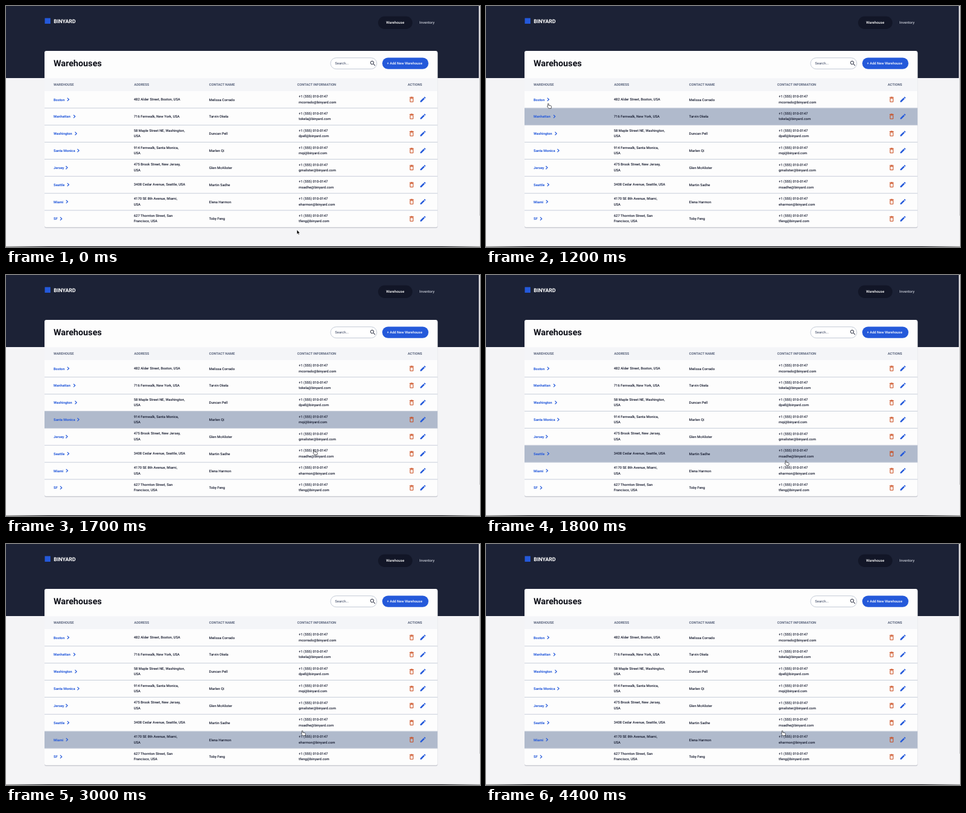
An HTML page for the animation above (4.6 s loop, 800 by 408 pixels).

```html
<!DOCTYPE html>
<html lang="en">
<head>
<meta charset="utf-8">
<title>Warehouses</title>
<style>
html, body { margin: 0; width: 100%; height: 100%; overflow: hidden; background: #f4f4f6; }
svg { display: block; width: 800px; height: 408px; }
text { font: 500 5.9px Roboto, "Open Sans", sans-serif; fill: #13182c; text-rendering: geometricPrecision; white-space: pre; }
.title { font-size: 14.7px; font-weight: 700; fill: #0b0d16; }
.brand { font-size: 9px; font-weight: 700; fill: #fff; }
.nav { font-size: 6.1px; fill: #fff; }
.dim { fill: #c3c7d2; }
.head { font-size: 5.75px; font-weight: 600; fill: #5c667e; }
.link { font-weight: 600; fill: #2459da; }
.hint { fill: #5c667e; }
.light { fill: #fff; }
</style>
</head>
<body>
<svg viewBox="0 0 800 408">
  <defs>
    <linearGradient id="edge">
      <stop offset="0" stop-color="#999"/>
      <stop offset=".09" stop-color="#16171c"/>
      <stop offset=".92" stop-color="#16171c"/>
      <stop offset="1" stop-color="#999"/>
    </linearGradient>
    <path id="trash" fill="#c94515" d="M6 19c0 1.1.9 2 2 2h8c1.1 0 2-.9 2-2V7H6v12zM8 9h8v10H8V9zm7.5-5l-1-1h-5l-1 1H5v2h14V4z"/>
    <path id="pencil" fill="#2459da" d="M3 17.25V21h3.75L17.81 9.94l-3.75-3.75L3 17.25zM20.71 7.04c.39-.39.39-1.02 0-1.41l-2.34-2.34c-.39-.39-1.02-.39-1.41 0l-1.83 1.83 3.75 3.75 1.83-1.83z"/>
    <path id="lens" fill="#2b3042" d="M15.5 14h-.79l-.28-.27C15.41 12.59 16 11.11 16 9.5 16 5.91 13.09 3 9.5 3S3 5.91 3 9.5 5.91 16 9.5 16c1.61 0 3.09-.59 4.23-1.57l.27.28v.79l5 4.99L20.49 19l-4.99-5zm-6 0C7.01 14 5 11.99 5 9.5S7.01 5 9.5 5 14 7.01 14 9.5 11.99 14 9.5 14z"/>
    <path id="chevron" d="M-1.5 -2.6L1.2 0L-1.5 2.6" fill="none" stroke="#2459da" stroke-width="1.2"/>
  </defs>

  <rect width="800" height="408" fill="#f4f4f6"/>
  <rect width="798" height="122" fill="#1c2236"/>
  <rect x="798" width="2" height="408" fill="#f3f3f4"/>
  <rect x="799" width="1" height="355" fill="#c6c6c9"/>
  <rect y="406.8" width="800" height="1.2" fill="url(#edge)"/>

  <rect x="65.5" y="20.5" width="9.5" height="9.5" fill="#2459da"/>
  <text class="brand" x="80.4" y="29">BINYARD</text>
  <rect x="628" y="17.5" width="58" height="21.5" rx="10.75" fill="#121627"/>
  <text class="nav" x="641.6" y="30.4">Warehouse</text>
  <text class="nav dim" x="697.8" y="30.4">Inventory</text>

  <rect x="65" y="77" width="663.5" height="299" rx="3" fill="#c9cbd2"/>
  <rect x="65" y="76" width="663.3" height="298.6" rx="3" fill="#fdfdfd"/>
  <rect x="65" y="122.4" width="663.3" height="21.6" fill="#f4f5f8"/>
  <text class="title" x="80.2" y="102">Warehouses</text>
  <rect x="547.8" y="87.8" width="78" height="18.8" rx="9.4" fill="#fff" stroke="#bcc3d1" stroke-width=".9"/>
  <text class="hint" x="555.2" y="99.4">Search...</text>
  <use href="#lens" transform="translate(613.3 91.3) scale(.49)"/>
  <rect x="635" y="87.5" width="78" height="19.2" rx="9.6" fill="#2459da"/>
  <text class="light" x="643" y="99.4">+ Add New Warehouse</text>

  <rect id="hover" x="65" width="663.3" height="28.85" fill="#b0bacc"/>
  <g id="table"></g>
  <path id="arrow" d="M0 0V7.2L1.7 5.7 2.8 8.3 4 7.8 2.9 5.3H5z" fill="#000" stroke="#fff" stroke-width=".5"/>
  <path id="hand" d="M-1.9 -4c.8 0 .9.6.9 1.2v2l3.2.6c1 .2 1.4.7 1.3 1.7L3 4.4H-1.2L-3.6 1.2c-.4-.7.3-1.2.9-.8l.1.1V-3c0-.6.1-1 .7-1z" fill="#fff" stroke="#20222a" stroke-width=".75"/>
</svg>
<script>
const TOP = 144, ROW = 28.85, STEP = 100, LOOP = 4600;
const $ = id => document.getElementById(id);

// city, chevron x, address lines, contact, mailbox
const rows = [
  ['Boston', 105, ['482 Alder Street, Boston, USA'], 'Melissa Corrado', 'mcorrado'],
  ['Manhattan', 115.5, ['716 Fernwalk, New York, USA'], 'Tarvin Okela', 'tokela'],
  ['Washington', 118, ['58 Maple Street NE, Washington,', 'USA'], 'Duncan Pell', 'dpell'],
  ['Santa Monica', 122, ['914 Fernwalk, Santa Monica,', 'USA'], 'Marlen Qi', 'mqi'],
  ['Jersey', 102.5, ['475 Brook Street, New Jersey,', 'USA'], 'Glen McAlister', 'gmalister'],
  ['Seattle', 105, ['3408 Cedar Avenue, Seattle, USA'], 'Martin Sadhe', 'msadhe'],
  ['Miami', 103, ['4170 SE 8th Avenue, Miami,', 'USA'], 'Elena Harmon', 'eharmon'],
  ['SF', 93, ['627 Thornton Street, San', 'Francisco, USA'], 'Toby Feng', 'tfeng']
];

const label = (x, y, s, cls = '') => `<text class="${cls}" x="${x}" y="${y}">${s}</text>`;
const icon = (id, x, y, scale) => `<use href="#${id}" transform="translate(${x} ${y}) scale(${scale})"/>`;
const pair = (x, y, lines) => lines.map((s, i) => label(x, y + i * 9.4, s)).join('');

const heads = [[80.3, 'WAREHOUSE'], [216.3, 'ADDRESS'], [342.8, 'CONTACT NAME'],
  [491.5, 'CONTACT INFORMATION'], [678, 'ACTIONS']];

$('table').innerHTML = heads.map(([x, s]) => label(x, 135.4, s, 'head')).join('') +
  rows.map(([city, chevron, address, name, mail], i) => {
    const y = TOP + ROW * i, mid = y + 14.4;
    return (i ? `<rect x="65" y="${y - .5}" width="663.3" height="1" fill="#c6ccd9"/>` : '') +
      label(80.3, mid + 2.1, city, 'link') + icon('chevron', chevron, mid - .2, 1) +
      pair(215.7, mid + (address.length > 1 ? -3.4 : 1.5), address) +
      label(342.8, mid + 2.1, name) +
      pair(494, mid - 3.3, ['+1 (555) 010-0147', mail + '@binyard.com']) +
      icon('trash', 678.6, mid - 6.2, .5) + icon('pencil', 697.7, mid - 6.2, .5);
  }).join('');

// pointer path: step, x, y
const path = [[0, 492, 382], [4, 738, 384], [6, 740, 330], [12, 107, 169], [14, 635, 100],
  [17, 522, 300], [18, 508, 318], [23, 506, 320], [30, 502, 320], [46, 502, 320]];

function pointer(step) {
  const i = path.findIndex(p => p[0] > step);
  const [a, ax, ay] = path[i - 1], [b, bx, by] = path[i];
  const k = (step - a) / (b - a);
  return [ax + (bx - ax) * k, ay + (by - ay) * k];
}

function rowAt([x, y]) {
  const row = Math.floor((y - TOP) / ROW);
  return x > 65 && x < 728 && row >= 0 && row < rows.length ? row : -1;
}

function place(el, visible, x, y) {
  el.setAttribute('visibility', visible ? 'visible' : 'hidden');
  el.setAttribute('transform', `translate(${x} ${y})`);
}

function draw(now) {
  const step = Math.floor(now % LOOP / STEP);
  const [x, y] = pointer(step);
  const onButton = x > 634 && x < 713 && y > 87 && y < 107;
  const clickable = onButton || rowAt([x, y]) >= 0;
  const row = rowAt(pointer(Math.max(0, step - 1))); // highlight trails the pointer by one step
  place($('hover'), row >= 0, 0, TOP + ROW * row);
  place($('hand'), clickable, x, y);
  place($('arrow'), !clickable, x - 1, y - 3);
}

function tick() {
  draw(performance.now());
  requestAnimationFrame(tick);
}
tick();
</script>
</body>
</html>
```
